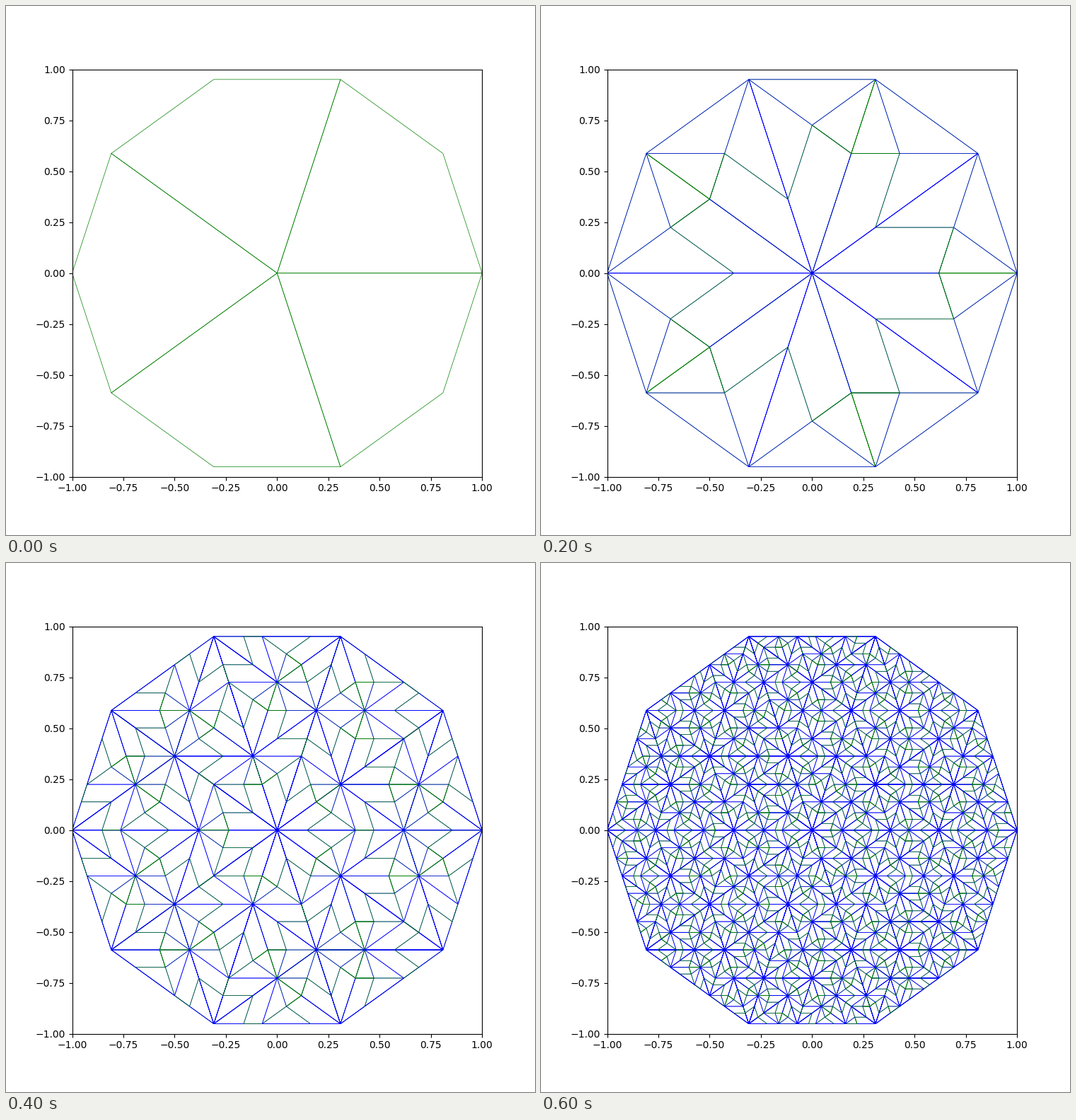
Write a matplotlib script that moves like this. It is 748x748 px and loops after 700 ms.

```python
import numpy as np
import matplotlib.pyplot as plt
from matplotlib.animation import FuncAnimation
from matplotlib.collections import LineCollection

SIZE, DPI = 748, 100
STEPS, INTERVAL = 7, 100
PHI = (1 + 5 ** 0.5) / 2
COLORS = ("green", "blue")  # acute, obtuse


def wheel():
    """Ten acute triangles around the origin, every other one mirrored."""
    tris = []
    for i in range(10):
        b, c = np.exp(1j * np.pi / 5 * np.array([i, i + 1]))
        if i % 2:
            b, c = c, b
        tris.append((0, 0j, b, c))
    return tris


def subdivide(tris):
    """One deflation step of the Robinson triangles."""
    out = []
    for kind, a, b, c in tris:
        if kind == 0:
            p = a + (b - a) / PHI
            out += [(0, c, p, b), (1, p, c, a)]
        else:
            q = b + (a - b) / PHI
            r = b + (c - b) / PHI
            out += [(1, r, c, a), (1, q, r, b), (0, r, q, a)]
    return out


def outlines(tris):
    """Two sides of each triangle, A-B-C, as one layer."""
    pts = np.array([t[1:] for t in tris])
    return LineCollection(
        np.stack([pts.real, pts.imag], axis=-1),
        colors=[COLORS[t[0]] for t in tris],
        linewidths=0.5,
        zorder=2,
    )


fig, ax = plt.subplots(figsize=(SIZE / DPI, SIZE / DPI), dpi=DPI)
ax.set_xlim(-1, 1)
ax.set_ylim(-1, 1)

layers = []
tris = wheel()
for _ in range(STEPS):
    layers.append(ax.add_collection(outlines(tris), autolim=False))
    tris = subdivide(tris)


def update(step):
    # each generation is drawn over the earlier ones
    for k, layer in enumerate(layers):
        layer.set_visible(k <= step)
    return layers


anim = FuncAnimation(fig, update, frames=STEPS, interval=INTERVAL, repeat=True)
plt.show()
```
